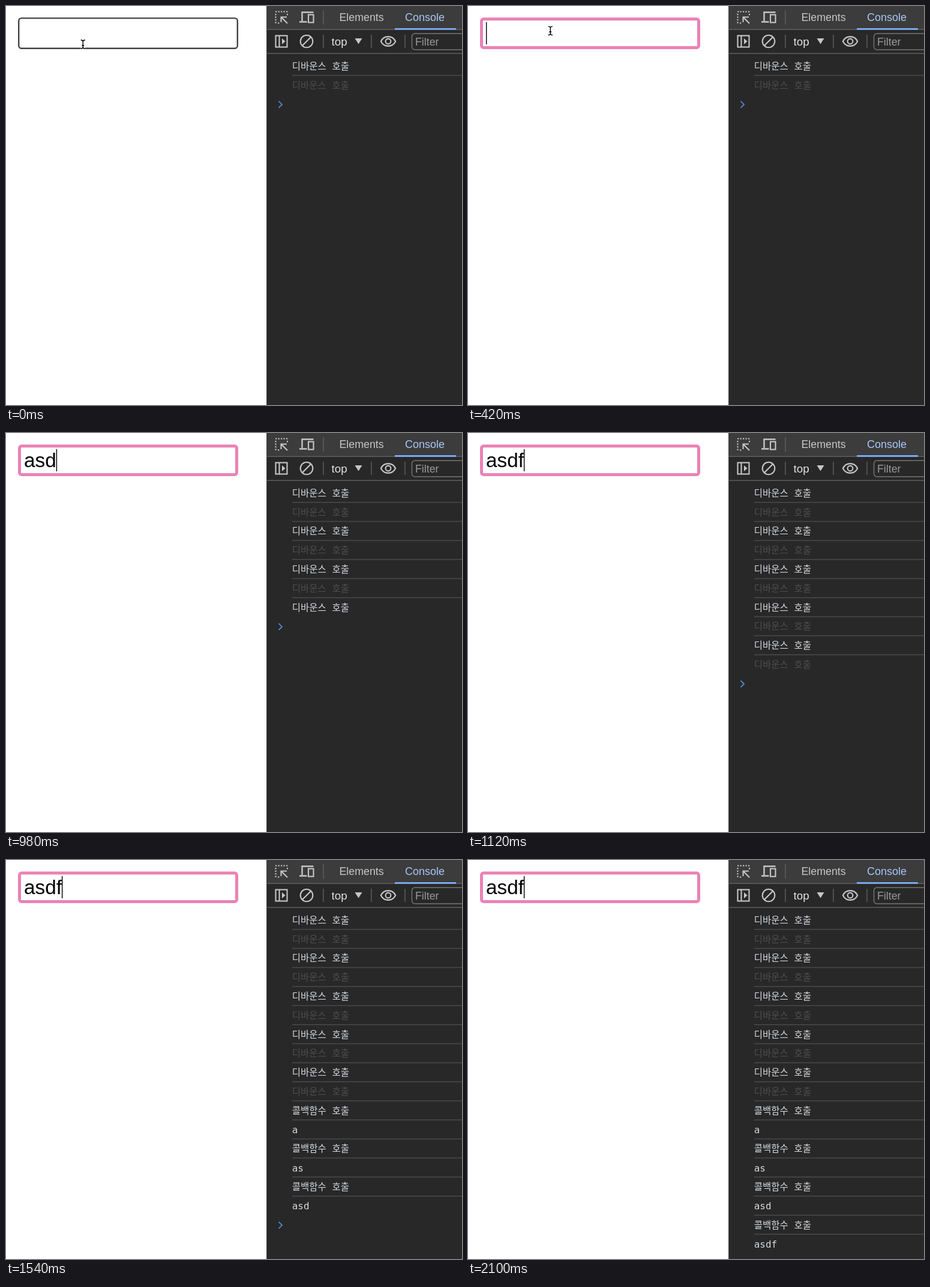
Write an HTML page that moves like this. It is 760 px wide and 666 px high and loops after 2380 ms.

```html
<!DOCTYPE html>
<html lang="ko">
<head>
<meta charset="utf-8">
<title>Debounce</title>
<style>
  html, body { margin: 0; width: 100%; height: 100%; overflow: hidden; background: #fff; }
  svg { display: block; width: 100%; height: 100%; }
  text { font-family: "Liberation Sans", Arial, sans-serif; white-space: pre; }
  .hangul { font: 15.5px "Noto Sans CJK KR", "Noto Sans CJK", sans-serif; }
  .mono { font: 16px "DejaVu Sans Mono", monospace; }
  .icon { fill: none; stroke: #c7c7c7; stroke-width: 2.1; }
  .rule { stroke: #5e5e5e; stroke-width: 1.5; }
</style>
</head>
<body>
<svg viewBox="0 0 760 666">
  <rect width="760" height="666" fill="#fff"/>

  <rect id="field"/>
  <text id="typed" x="30" y="57" font-size="33.3" fill="#000"></text>
  <rect id="caret" y="27" width="1.4" height="37" fill="#000"/>
  <g id="pointer" fill="none">
    <path id="beam" d="M-3.6-7.2Q-.4-7.2 0-5Q.4-7.2 3.6-7.2M0-5V5M-3.6 7.2Q-.4 7.2 0 5Q.4 7.2 3.6 7.2M-2 2H2" stroke="#fff" stroke-width="3"/>
    <use href="#beam"/>
    <path d="M-3.6-7.2Q-.4-7.2 0-5Q.4-7.2 3.6-7.2M0-5V5M-3.6 7.2Q-.4 7.2 0 5Q.4 7.2 3.6 7.2M-2 2H2" stroke="#000" stroke-width="1.4"/>
  </g>

  <rect x="434" width="326" height="666" fill="#282828"/>
  <rect x="434" width="326" height="39" fill="#3c3c3c"/>
  <path class="rule" d="M434 39.2H760M434 79.2H760"/>
  <path class="rule" d="M529 7V31M529 48V70M609 48V70M665 48V70"/>
  <path d="M434.5 0V666" stroke="#4a4a4a"/>

  <g class="icon">
    <path d="M449 9.5H470M449.5 13V30M469 13V17M453 28.5H457" stroke-dasharray="2.3 2.2"/>
    <path d="M458.5 27V18.5H468M459 19L469 29"/>
    <path d="M512.5 10.5H493.5V25M489 26.5H501.5" stroke-width="2.4"/>
    <rect x="504" y="14.5" width="8.5" height="13"/>
    <rect x="449.5" y="49.5" width="19" height="19"/>
    <path d="M455.5 49V69"/>
    <path d="M460 54L465.5 59L460 64Z" fill="#c7c7c7" stroke="none"/>
    <circle cx="501" cy="59" r="10.3"/>
    <path d="M494 66L508 52"/>
    <path d="M624.8 59C630 48.5 644 48.5 649.2 59C644 69.5 630 69.5 624.8 59Z"/>
    <circle cx="637" cy="59" r="4.4"/>
  </g>

  <text x="555.5" y="25" font-size="17.8" fill="#c7c7c7">Elements</text>
  <text x="665" y="25" font-size="18" fill="#a8c7fa">Console</text>
  <rect x="648" y="37" width="102" height="2.8" fill="#7cacf8"/>
  <text x="542.5" y="66" font-size="18.8" fill="#e3e3e3">top</text>
  <path d="M581.5 54H593.5L587.5 63.5Z" fill="#c7c7c7"/>
  <rect x="676.5" y="46" width="110" height="27" rx="5" fill="none" stroke="#757575" stroke-width="1.5"/>
  <text x="682" y="66" font-size="17.8" fill="#9a9a9a">Filter</text>

  <g id="log"></g>
  <path id="prompt" d="M454.5-5.5L460 0L454.5 5.5" fill="none" stroke="#5286cc" stroke-width="1.9"/>
</svg>
<script>
const LOOP = 2380, STEP = 70, PITCH = 31.8, FIRST = 99.8;
const FOCUS = 420, TYPE = 840, CALLBACK = 1400;
const WORD = 'asdf';
const WIDTHS = [0, 0.556, 1.056, 1.612, 1.89];
const $ = id => document.getElementById(id);
const set = (el, attrs) => {
  for (const k in attrs) el.setAttribute(k, attrs[k]);
  return el;
};
const add = (parent, name, attrs, text = '') => {
  const el = set(document.createElementNS('http://www.w3.org/2000/svg', name), attrs);
  el.textContent = text;
  parent.append(el);
  return el;
};

// Ten debounce rows, then a callback row and its value for each key
const rows = Array.from({ length: 18 }, (_, i) => {
  const row = add($('log'), 'g', {});
  const y = FIRST + i * PITCH;
  const fill = i < 10 && i % 2 ? '#4e4e4e' : '#d6dae0';
  if (i) add(row, 'rect', { x: 477, y: y - 16.6, width: 283, height: 1.6, fill: '#484848' });
  if (i > 10 && i % 2) {
    add(row, 'text', { class: 'mono', x: 476.7, y: y + 6.4, fill }, WORD.slice(0, (i - 9) / 2));
  } else {
    add(row, 'text', { class: 'hangul', x: 476.7, y: y + 5.9, fill }, i < 10 ? '디바운스' : '콜백함수');
    add(row, 'text', { class: 'hangul', x: 543.6, y: y + 5.9, fill }, '호출');
  }
  return row;
});

function rowCount(t) {
  if (t < TYPE) return 2;
  const n = Math.floor((t - TYPE) / STEP);
  if (t < CALLBACK) return Math.min(10, 3 + 2 * n);
  return Math.min(18, 12 + 2 * Math.floor((t - CALLBACK) / STEP));
}

function render(time) {
  const t = Math.floor(time % LOOP / STEP) * STEP;
  const focused = t >= FOCUS;
  const w = focused ? 5 : 2.4;
  set($('field'), {
    x: 20 + w / 2, y: 19.2 + w / 2, width: 367 - w, height: 52.8 - w,
    rx: focused ? 3.5 : 4.5, fill: '#fff',
    stroke: focused ? '#ea82b5' : '#424242', 'stroke-width': w
  });

  const keys = t < TYPE ? 0 : Math.min(4, 1 + Math.floor((t - TYPE) / STEP));
  $('typed').textContent = WORD.slice(0, keys);
  const lit = focused && !(t >= 1610 && t < 2100);
  set($('caret'), { x: 30 + WIDTHS[keys] * 33.3, visibility: lit ? 'visible' : 'hidden' });

  const p = Math.min(1, t / 350), ease = p * (2 - p);
  set($('pointer'), {
    transform: `translate(${128.3 + 9 * ease} ${64 - 22.7 * ease})`,
    visibility: t < TYPE ? 'visible' : 'hidden'
  });

  const count = rowCount(t);
  rows.forEach((row, i) => set(row, { visibility: i < count ? 'visible' : 'hidden' }));
  set($('prompt'), { transform: `translate(0 ${FIRST + 1 + count * PITCH})` });
}

const start = performance.now();
function tick() {
  render(performance.now() - start);
  requestAnimationFrame(tick);
}
tick();
</script>
</body>
</html>
```
